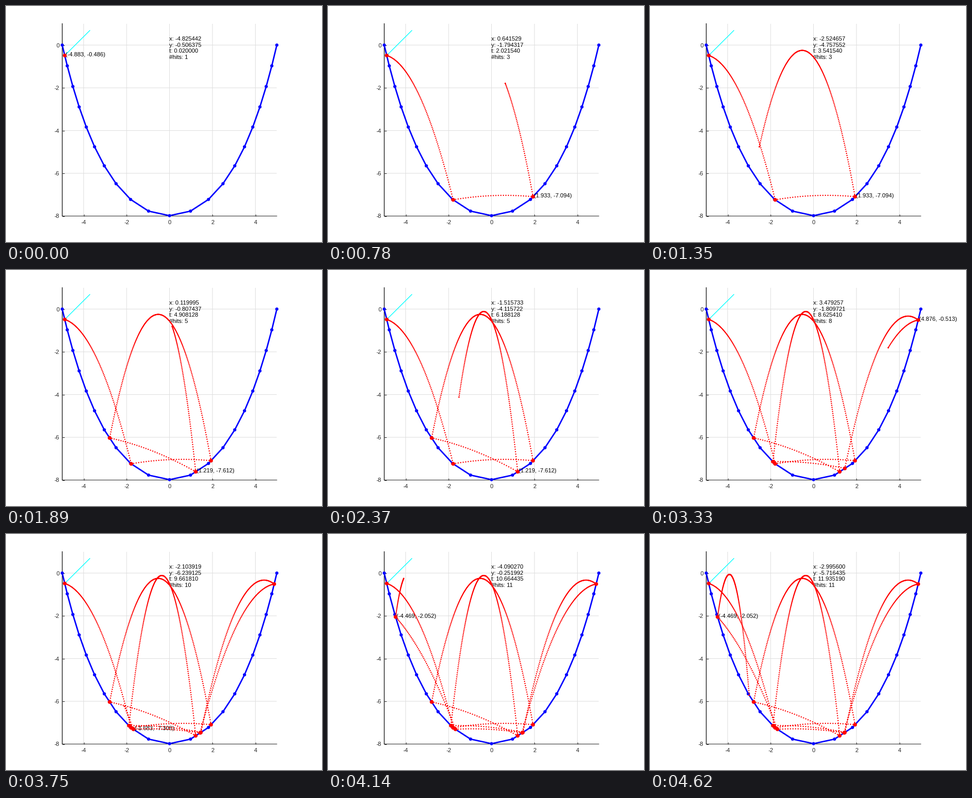
Animation, 600 px wide and 450 px high, one loop 4650 ms. Source, as a matplotlib script:

```python
import numpy as np
import matplotlib.pyplot as plt
from matplotlib.animation import FuncAnimation

W, H, DPI = 600, 450, 100
FRAMES, INTERVAL = 155, 30
G, DT, STRIDE = 9.81, 0.02, 4
PT = 72 / DPI                      # points per pixel
SCALE = 40.75                      # pixels per data unit
INK = "#262626"

plt.rcParams["font.family"] = "Liberation Sans"
plt.rcParams["font.size"] = 11 * PT
plt.rcParams["path.snap"] = False
plt.rcParams["path.simplify"] = False

# Hanging chain of twenty unit links; the slopes grow evenly from the middle.
angles = np.arctan(0.2178 * np.arange(-19, 20, 2))
chain_x = np.concatenate([[0], np.cumsum(np.cos(angles))])
chain_x -= chain_x[-1] / 2
chain_y = np.concatenate([[0], np.cumsum(np.sin(angles))])

# Bounce points on the chain and the flight time between them.
hit_x = np.array([-4.88256, -1.7876, 1.933, -2.7892, 1.219, -1.8908,
                  1.459, 4.87605, 1.4284, -1.6835, -4.4693, -2.9956])
hit_y = np.interp(hit_x, chain_x, chain_y)
flight_time = np.array([1.0837, 0.31784, 2.267, 0.379588, 2.4335, 0.285358,
                        1.398424, 1.1354, 0.261, 0.662625, 1.710755])
start_time = np.concatenate([[0], np.cumsum(flight_time)])
vel_x = np.diff(hit_x) / flight_time
vel_y = np.diff(hit_y) / flight_time + G * flight_time / 2


def ball(j, t):
    """Position on flight j, t seconds after the bounce."""
    return hit_x[j] + vel_x[j] * t, hit_y[j] + vel_y[j] * t - G * t * t / 2


def sample(duration, step, extra=0):
    count = int(np.ceil(duration / step)) + 1 + extra
    return np.minimum(np.arange(count) * step, duration)


# Simulation steps; the end of a long flight is held for one more step.
steps = [(j, t) for j, T in enumerate(flight_time)
         for t in sample(T, DT, int(T > 1))]

dot_t, dot_x, dot_y = [], [], []
for j, T in enumerate(flight_time):
    local = sample(T, DT / 2)
    x, y = ball(j, local)
    dot_t.extend(start_time[j] + local)
    dot_x.extend(x)
    dot_y.extend(y)
dot_t, dot_x, dot_y = map(np.array, (dot_t, dot_x, dot_y))

fig = plt.figure(figsize=(W / DPI, H / DPI), dpi=DPI, facecolor="white")
ax = fig.add_axes([106.75 / W, 49.5 / H, 407.5 / W, 366.75 / H])
ax.set_xlim(-5, 5)
ax.set_ylim(-8, 1)
ax.set_axisbelow(True)
ax.grid(True, color="#dedede", lw=1 * PT)
x_ticks, y_ticks = range(-4, 5, 2), range(-8, 1, 2)
ax.set_xticks(x_ticks, [str(v) for v in x_ticks])
ax.set_yticks(y_ticks, [str(v) for v in y_ticks])
ax.tick_params(direction="in", length=4 * PT, width=1 * PT,
               color=INK, labelcolor=INK)
ax.tick_params(axis="x", pad=7 * PT)
ax.tick_params(axis="y", pad=5.5 * PT)
for side in ("top", "right"):
    ax.spines[side].set_visible(False)
for side, width in (("left", 1.4), ("bottom", 1)):
    ax.spines[side].set(color=INK, linewidth=width * PT)


def dot_path(x, y, eps=0.001):
    """Tiny separate strokes; round caps turn them into subpixel dots."""
    x = np.asarray(x)
    path_x = np.column_stack([x - eps, x + eps, np.full(len(x), np.nan)])
    return path_x.ravel(), np.repeat(y, 3)


def dots(x, y, size, color, zorder):
    line, = ax.plot(*dot_path(x, y), color=color, lw=size * PT,
                    solid_capstyle="round", clip_on=False, zorder=zorder)
    return line


ax.plot(chain_x, chain_y, color="blue", lw=2.7 * PT, clip_on=False, zorder=3)
dots(chain_x, chain_y, 6.2, "blue", 3)
ax.plot([hit_x[0], hit_x[0] + 1.18], [hit_y[0], hit_y[0] + 1.18],
        color="cyan", lw=1.3 * PT, solid_capstyle="butt", zorder=3.5)

info = [ax.text(0, (8.5 - 11.5 * i) / SCALE, "", va="baseline", zorder=4)
        for i in range(4)]
label = ax.text(0, 0, "", va="baseline", zorder=4)
trail = dots([], [], 2.4, "red", 5)
hits = dots([], [], 7.3, "red", 6)


def draw(k):
    j, local = steps[1 + STRIDE * k]
    x, y = ball(j, local)
    now = start_time[j] + local

    past = dot_t <= now + 1e-9
    trail.set_data(*dot_path(np.append(dot_x[past], x),
                             np.append(dot_y[past], y)))
    hits.set_data(*dot_path(hit_x[:j + 1], hit_y[:j + 1]))

    label.set_position((hit_x[j] + 1.8 / SCALE, hit_y[j] - 1.5 / SCALE))
    label.set_text(f"({hit_x[j]:.3f}, {hit_y[j]:.3f})")
    lines = (f"x: {x:.6f}", f"y: {y:.6f}", f"t: {now:.6f}", f"#hits: {j + 1}")
    for text, line in zip(info, lines):
        text.set_text(line)
    return [trail, hits, label, *info]


anim = FuncAnimation(fig, draw, frames=FRAMES, interval=INTERVAL,
                     init_func=lambda: draw(0), repeat=True, repeat_delay=0)
plt.show()
```
